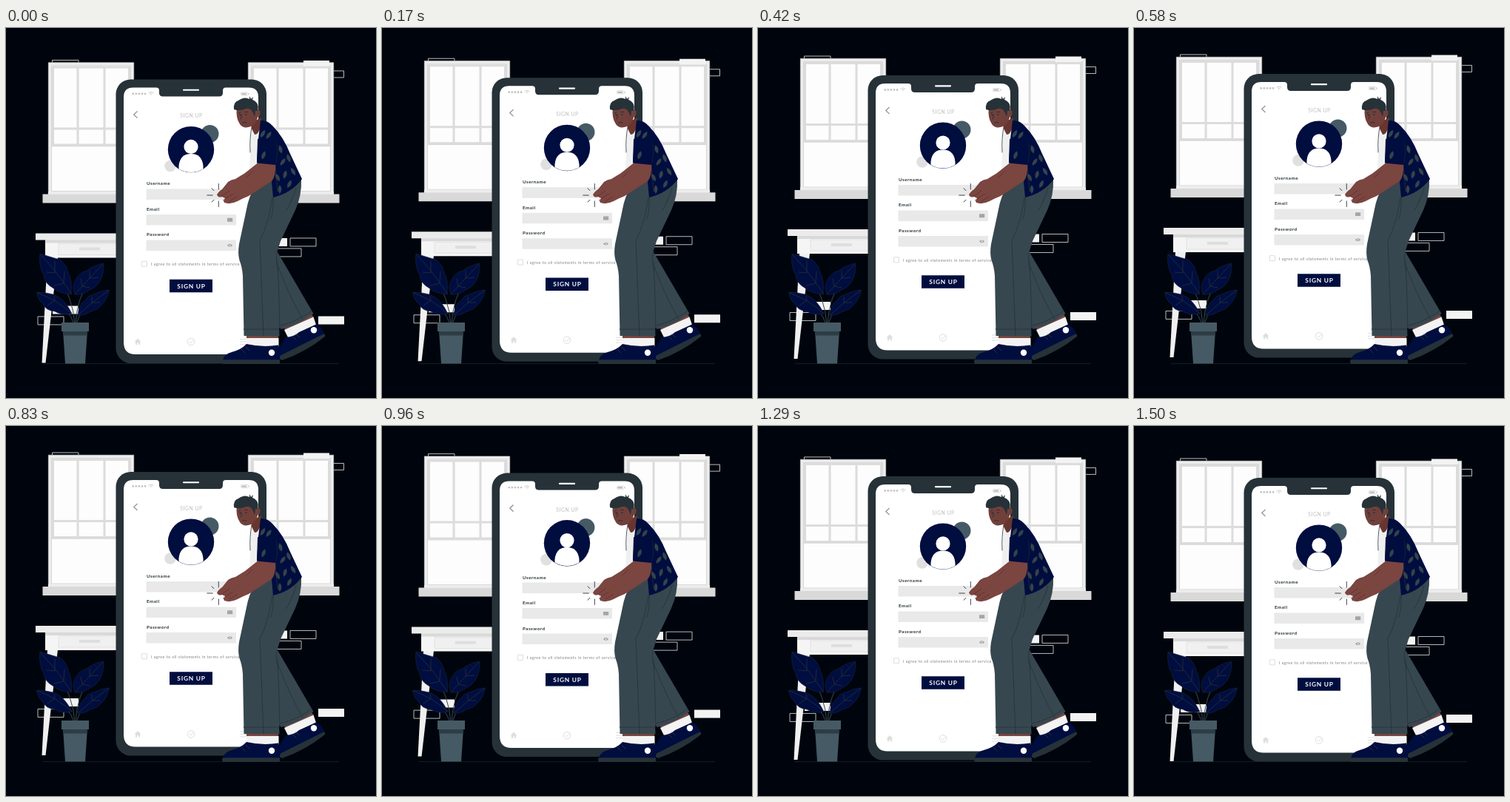
Write an HTML page that moves like this. It is 500 px wide and 500 px high and loops after 1.54 s.

```html
<!DOCTYPE html>
<html lang="en">
<head>
<meta charset="utf-8">
<title>Sign up</title>
<style>
  html, body { margin: 0; width: 100%; height: 100%; overflow: hidden; background: #00050d; }
  svg { display: block; width: 100vw; height: 100vh; }
  text { font-family: Lato, "Open Sans", sans-serif; }
  .navy { fill: #000d3f; }
  .dark { fill: #263238; }
  .slate { fill: #37474f; }
  .steel { fill: #455a64; }
  .skin { fill: #7b4540; }
  .pale { fill: #e9e9e9; }
  .line { fill: none; stroke: #263238; stroke-linecap: round; stroke-linejoin: round; }
  .thin { fill: none; stroke: #dedede; }
  .label { font-size: 6.3px; font-weight: 700; letter-spacing: .45px; fill: #263238; }
  .title { font-size: 6.8px; letter-spacing: .55px; fill: #bdbdbd; text-anchor: middle; }
  .button { font-size: 8.4px; font-weight: 700; letter-spacing: .75px; fill: #fff; text-anchor: middle; }
  .terms { font-size: 5.3px; letter-spacing: .46px; fill: #808080; }
</style>
</head>
<body>
<svg viewBox="0 0 500 500">
  <defs>
    <g id="window">
      <path fill="#ededed" stroke="#cfcfcf" stroke-width=".6" d="M57.3 47.3H172.7V226H57.3Z"/>
      <path fill="#fdfdfd" stroke="#d0d0d0" stroke-width=".8" d="M61.5 51.5H168.5V221H61.5Z"/>
      <path fill="none" stroke="#dcdcdc" stroke-width="3" d="M63.5 158.5V53.5H166.5V158.5Z M97 53V158 M133 53V158 M64 136.5H166"/>
      <path fill="none" stroke="#c9c9c9" stroke-width=".7" d="M62 160.3H168"/>
      <path fill="#d9d9d9" d="M49.5 225H180V237H49.5Z"/>
      <path fill="#ededed" d="M57 221.5H173V225H57Z"/>
    </g>
    <path id="spot" d="M0-6Q5 0 0 6Q-5 0 0-6"/>
  </defs>

  <g id="floating">
    <use href="#window"/>
    <use href="#window" transform="matrix(-1 0 0 1 500 0)"/>

    <g fill="#f3f3f3">
      <path d="M402 44.5H437V52H402Z M345 284.5H380V295.5H345Z M422 390H457V401H422Z M63 376H98V387H63Z"/>
      <path fill="none" stroke="#e8e8e8" stroke-width=".8" d="M62.5 47V44H98V47 M443 58.5H456.5V67.5H443 M384 284.5H419V295.5H384Z M364 298.5H399V309.5H364Z M43 390.5H78V401.5H43Z"/>
    </g>

    <path fill="#f0f0f0" d="M56 310H70L53.5 453H48.5Z"/>
    <path fill="#f5f5f5" d="M53 286H160V311H53Z"/>
    <path fill="#d9d9d9" d="M53 286.5H160V291H53Z"/>
    <path fill="#f0f0f0" stroke="#dedede" stroke-width=".8" d="M71 292H160V307H71Z"/>
    <path fill="#dedede" d="M99 297H127V301H99Z"/>
    <path fill="#ebebeb" d="M40 278H160V287H40Z"/>

    <rect class="dark" x="148.5" y="70" width="203.5" height="383.5" rx="20"/>
    <path fill="#fff" d="M172 81H203Q207 81 207 85V88Q207 93 212 93H288Q293 93 293 88V85Q293 81 297 81H328Q341 81 341 94V425Q341 441.5 325 441.5H175Q159 441.5 159 425V94Q159 81 172 81Z"/>
    <path stroke="#fff" stroke-width="2.2" stroke-linecap="round" d="M240 84.3H260"/>

    <path stroke="#c3c3c3" stroke-width="2.8" stroke-linecap="round" stroke-dasharray="0 4.1" d="M171.7 89.5H189"/>
    <path fill="none" stroke="#cacaca" d="M192.7 88.3Q196 85.8 199.3 88.3M194.3 90Q196 88.7 197.7 90M196 91.5V92"/>
    <rect class="thin" x="317.5" y="87.5" width="9.5" height="4.2" rx="1"/>
    <path fill="#bdbdbd" d="M318.5 88.5H325V90.8H318.5Z M327.5 88.7H328.5V90.6H327.5Z"/>
    <path fill="none" stroke="#9b9b9b" stroke-width="1.4" d="M177.5 113L172.8 117.5L177.5 122"/>
    <text class="title" x="250.5" y="122">SIGN UP</text>

    <circle class="steel" cx="275.5" cy="143.5" r="12"/>
    <circle fill="#e0e0e0" cx="222" cy="187" r="7.8"/>
    <circle class="navy" cx="250" cy="164.7" r="31.2"/>
    <circle fill="#fff" cx="250" cy="161" r="9.6"/>
    <path fill="#fff" d="M233.5 191V187Q235 170.5 250 170.5T266.5 187V191Q250 200 233.5 191Z"/>

    <text class="label" x="190" y="213">Username</text>
    <text class="label" x="190" y="247.5">Email</text>
    <text class="label" x="190" y="282">Password</text>
    <path class="pale" d="M189.5 218H311V232.5H189.5Z M189.5 252.5H311V267H189.5Z M189.5 287H311V301.5H189.5Z"/>
    <path fill="#a5a5a5" d="M299 257.3H306.2V262.2H299Z M298.8 294.3Q302.5 290.5 306.2 294.3Q302.5 298 298.8 294.3"/>
    <circle cx="302.5" cy="294.3" r="1" fill="#e9e9e9"/>
    <path class="thin" d="M183.5 315.8H190.5V322.8H183.5Z"/>
    <text class="terms" x="196" y="321.7">I agree to all statements in terms of service</text>
    <path class="navy" d="M221 340.3H279V357.8H221Z"/>
    <text class="button" x="250.5" y="352.2">SIGN UP</text>

    <path fill="#dedede" d="M173.5 424.5L178 420L182.5 424.5H181V428.5H179V426H177V428.5H175V424.5Z"/>
    <circle class="thin" cx="250" cy="424.5" r="4.8"/>
    <path class="thin" d="M247.5 424.3L249.5 426.2L254 421.5 M316 421H325M316 424.5H325M316 428H325"/>
  </g>

  <path stroke="#1c262d" stroke-width=".8" d="M50 453.6H450"/>
  <g id="spark" class="line" stroke-width=".9"></g>

  <g id="plant">
    <path class="line" style="stroke:#37474f" d="M93 400Q91 365 68 330M94 400Q96 365 112 342M92 400Q85 378 60 368M95 400Q101 378 122 366"/>
    <g class="navy" stroke="#1b2744" stroke-width=".6">
      <path d="M46 305Q62 310 73 313Q82 320 84 331Q90 342 88 360Q72 359 63 351Q52 345 51 334Q44 322 46 305Z"/>
      <path d="M131.500 318Q132 333 128 340Q123 350 113 354Q104 361 93 360Q88 349 95 339Q99 331 109 328Q118 321 131.500 318Z"/>
      <path d="M41.500 357Q53 357 64 360Q79 365 89 386Q76 389 66 383Q54 382 50 373Q43 367 41.500 357Z"/>
      <path d="M139.500 354Q137 367 130 373Q124 381 114 383Q106 389 97 388Q98 375 106 369Q111 361 121 359Q130 354 139.500 354Z"/>
    </g>
    <path class="line" stroke-width=".8" d="M47 307Q70 330 88 359M55 330L66 331L66 315M65 348L78 345L79 329M130 320Q109 342 94 359M125 337L113 338L113 328M113 351L103 349L101 339M43 358Q70 368 89 386M56 375L66 368L65 363M138 355Q117 370 97 388M127 371L116 371L116 363"/>
    <path class="steel" d="M77 409H110L107 453.500H80Z M75 398H112V410H75Z"/>
    <path fill="#2c3d46" d="M77.300 410H109.900L109.500 415.500H77.700Z"/>
  </g>

  <g id="man">
    <path class="skin" d="M375 404L413 387L416 391L378 409Z"/>
    <path fill="#f3f3f3" d="M376 408L415.500 390.500L419 401L382 420Z"/>
    <path class="navy" d="M378 418Q390 417 396 411L419 400.500Q428 405 430 413.500L371 445Q364 439 372 427Z"/>
    <path class="dark" d="M366 445L430 413L431.500 416.500Q405 438 373 449Z"/>
    <circle cx="416" cy="408.300" r="4.200" fill="#fff"/>
    <path class="line" stroke="#fff" d="M387 417L392 421M392 414L397 418"/>

    <path class="slate" d="M352 290L367 303L415.500 386Q396 401 372 407L364 400Z"/>
    <path class="line" stroke-width=".8" d="M367 315L369 366L370 406M368 323Q384 365 401 394M371 402Q395 396 413 382"/>

    <path class="skin" d="M325 415H368V420H325Z"/>
    <path fill="#f3f3f3" d="M325 419H368.500V431H325Z"/>
    <path class="navy" d="M325 427Q347 432 368 428.500Q372 439 369.500 449H293Q294 441 305 438Q318 434.500 325 427Z"/>
    <path class="dark" d="M293 448.300H370V454H293Q291 451 293 448.300Z"/>
    <circle cx="359" cy="438.700" r="4.200" fill="#fff"/>
    <path class="line" stroke="#fff" d="M318 434L323 439M324 431L329 436"/>

    <path class="slate" d="M358 203L399 204Q400 226 391 246L371 288L366 304L369.500 416.500L321.500 416L320 335Q319 322 315.500 314Q313 304 315 292L325 245Q328 228 336 215Z"/>
    <path class="line" stroke-width=".8" d="M360 229Q353 272 343 286L348 416M392 216Q385 238 378 247M361 229Q362 246 358 258M321 407H369M366 304Q364 315 368 327"/>

    <path fill="#f0f0f0" d="M332 136L344 132L355 185L329 191Z"/>
    <path fill="#69362f" d="M331 128L345 121L344 134Q341 144 336 144L332 136Z"/>
    <path class="navy" d="M344 125Q353 124 360 132Q375 147 384 170L400 204Q386 223 361 229L357 186L339 182L341 150Z"/>
    <path class="line" stroke-width=".8" d="M332 134Q329 150 330 168M365 155Q368 172 364 184L367 221"/>
    <g id="spots" fill="#35434a"></g>

    <path fill="#71403b" d="M312 107Q310 121 316 130Q321 137 331 133Q339 129 342 114L337 103Z"/>
    <ellipse cx="340" cy="115" rx="3.500" ry="4.500" fill="#71403b"/>
    <path class="dark" d="M308 110Q307 100 314 98Q322 92 329 96L329 92L331 96L334 93L333 97Q343 101 340 112L337 112L336 120L333 113Q330 108 324 109Q316 113 308 110Z"/>
    <path class="line" stroke-width="1" d="M314.500 115L317 114M322.500 113.500L326.500 113.500M318 117V121L317 123M319.500 128Q322 126.500 325 128"/>
    <g class="dark"><circle cx="316.500" cy="117.500" r="1.100"/><circle cx="324.500" cy="117" r="1.100"/></g>

    <path class="skin" d="M340 182.500L364 184Q365 201 359 207Q345 216 328 227Q318 231 313 234Q303 239 295 236Q293 233 296 230L292 228Q287 230 285 225.500Q287 221 292 218L300 208Q304 205 310 204L323 196Q333 188 340 182.500Z"/>
    <path class="line" style="stroke:#573029" stroke-width=".7" d="M292 227L302 220M297 230L307 224M302 234L312 228M325 202L333 194"/>
    <path class="navy" d="M340 150L365 155Q367 173 364 185L339 182.500Z"/>
    <use href="#spot" transform="translate(348 172) rotate(20)" fill="#35434a"/>
    <use href="#spot" transform="translate(355 145) rotate(35)" fill="#35434a"/>
  </g>
</svg>
<script>
  const LOOP = 1540, TOP_TIME = 705, RISE = 10, REST = 0.3;
  const byId = id => document.getElementById(id);

  // Leaf print on the shirt: x, y, angle
  byId("spots").innerHTML = [
    [347, 143, 30], [357, 168, 10], [371, 164, -15], [374, 181, 35], [382, 176, -20],
    [367, 202, -25], [377, 198, 15], [388, 194, -30], [383, 211, 25], [370, 218, 0]
  ].map(([x, y, a]) => `<use href="#spot" transform="translate(${x} ${y}) rotate(${a})"/>`).join("");

  byId("spark").innerHTML = [0, 45, 90, 135, 180, 225, 270, 315].map(a =>
    `<path d="M0-${a % 90 ? 9 : 8}V-${a % 90 ? 13 : 15.5}" transform="translate(287.300 226) rotate(${a})"/>`
  ).join("");

  // Steady rise and fall: a triangle wave peaking at TOP_TIME
  const floating = byId("floating");
  function draw() {
    const phase = (performance.now() - TOP_TIME + LOOP) % LOOP / LOOP;
    const y = REST - RISE * Math.abs(1 - 2 * phase);
    floating.setAttribute("transform", `translate(0 ${y.toFixed(2)})`);
    requestAnimationFrame(draw);
  }
  draw();
</script>
</body>
</html>
```
